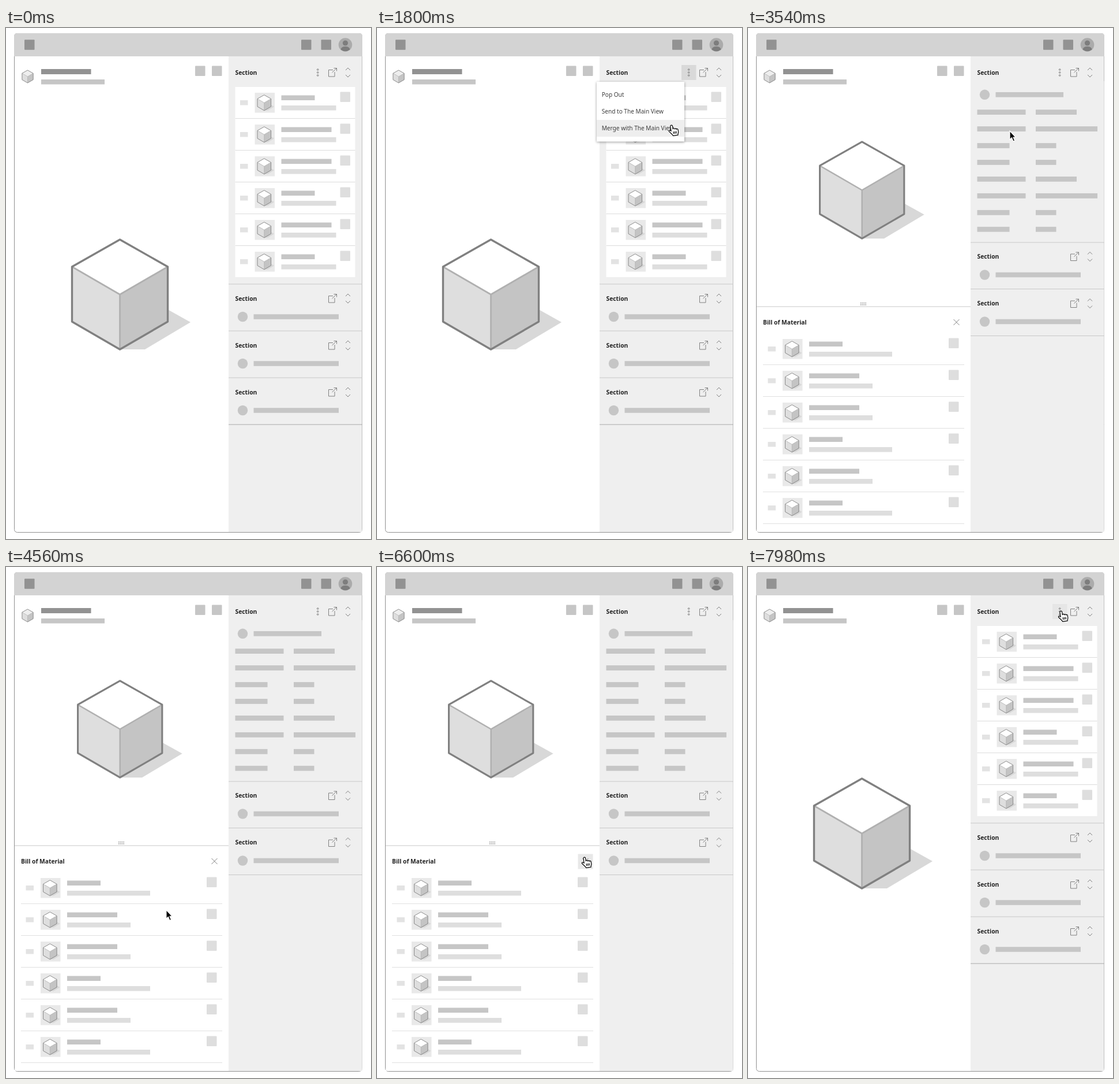
An HTML page for the animation above (8 s loop, 633 by 884 pixels).

```html
<!DOCTYPE html>
<html lang="en">
<head>
<meta charset="utf-8">
<style>
  html, body { margin: 0; width: 100%; height: 100%; overflow: hidden; background: #fff; }
  svg { display: block; }
  text { font: 400 10.1px "Noto Sans", sans-serif; fill: #3c3c3c; }
  .b { font-weight: 600; font-size: 10.3px; fill: #222; }
  .icon { fill: none; stroke: #808080; }
  #menu { filter: drop-shadow(0 1px 2px #0006); }
</style>
</head>
<body>
<svg id="stage" width="633" height="884" viewBox="0 0 633 884"></svg>
<script>
const MID = '#c6c6c6', PALE = '#dedede', DARK = '#929292';
const shortRows = [1, 0, 0, 1, 0, 1];

const rect = (x, y, w, h, fill, more = '') =>
  `<rect x="${x}" y="${y}" width="${w}" height="${h}" fill="${fill}" ${more}/>`;
const circle = (x, y, r, fill) => `<circle cx="${x}" cy="${y}" r="${r}" fill="${fill}"/>`;
const line = (x1, x2, y, color) => `<path d="M${x1} ${y}H${x2}" stroke="${color}"/>`;
const text = (x, y, s, cls = '') => `<text x="${x}" y="${y}" class="${cls}">${s}</text>`;
const square = (x, y, fill, size = 17.5) => rect(x, y, size, size, fill, 'rx="1"');

function cube(x, y, scale, width, top = '#fff', shadow = true) {
  const k = 'vector-effect="non-scaling-stroke" stroke-linejoin="round"';
  return `<g transform="translate(${x} ${y}) scale(${scale})">
    ${shadow ? '<path d="M83 26L122.500 48L43.500 95H0Z" fill="#d8d8d8"/>' : ''}
    <path d="M0-95L83-48L0 0L-83-48Z" fill="${top}"/>
    <path d="M-83-48L0 0V95L-83 47Z" fill="#dedede"/>
    <path d="M83-48L0 0V95L83 47Z" fill="#c4c4c4"/>
    <path d="M-83-48L0 0L83-48M0 0V95" fill="none" stroke="#b0b0b0" stroke-width="${width * .8}" ${k}/>
    <path d="M0-95L83-48V47L0 95L-83 47V-48Z" fill="none" stroke="#808080" stroke-width="${width}" ${k}/>
  </g>`;
}

// One part row; x and y are the corner of its thumbnail
const row = (x, y, isShort, subWidth, squareX) =>
  rect(x - 25.5, y + 13, 13.5, 8.5, '#e3e3e3') +
  rect(x, y, 34.5, 34.5, '#e9e9e9') + cube(x + 16.3, y + 17.3, .142, .9) +
  rect(x + 46, y + 4.5, isShort ? 58 : 87, 8.5, MID) +
  rect(x + 46, y + 22, subWidth, 8.5, PALE) + square(squareX, y - 1.5, PALE);

const header = y => text(397.5, y + 3.7, 'Section', 'b') +
  `<path class="icon" transform="translate(0 ${y})" d="M567-4.500H559.500V7H570V-1
    M565.500 0L573.500-7.500M568.500-7.500H573.500V-2.500M589-4L593-8L597-4M589 4L593 8L597 4"/>`;
const section = (y, last) => header(y) + circle(410.5, y + 31.5, 8.7, MID) +
  rect(429.5, y + 27.2, 147.5, 8.6, MID) + line(386, 618, y + 56, last ? '#a8a8a8' : '#c8c8c8');

const listView = cube(197.5, 461, 1, 3.4) +
  rect(397.5, 102, 208, 329, '#fff') +
  shortRows.map((s, i) => row(431.5, 112 + 55 * i, s, 95, 579.5) +
    (i ? line(397.5, 605.5, 101.5 + 55 * i, '#dcdcdc') : '')).join('') +
  line(386, 618, 443, '#c8c8c8') +
  [468, 549, 630].map((y, i) => section(y, i === 2)).join('');

const details = Array.from({ length: 8 }, (_, i) => {
  const y = 141.2 + 28.95 * i;
  return rect(397.5, y, [84, 84, 56, 56][i % 4], 8.8, MID) +
    rect(499, y, [71, 107, 35.5, 35.5][i % 4], 8.8, MID);
}).join('');

const grip = Array.from({ length: 8 }, (_, i) =>
  rect(195 + i % 4 * 2.8, i < 4 ? 475 : 478, 1.5, 1.5, '#888')).join('');

const splitView = rect(15, 100, 371, 771.5, '#fff') + rect(386, 92, 231.5, 779.5, '#efefef') +
  cube(197.7, 280.5, .881, 3.1) +
  circle(410.5, 115.3, 8.7, MID) + rect(429.5, 111, 117.5, 8.6, MID) + details +
  line(386, 618, 371, '#c8c8c8') + section(395.5) + section(476.5) +
  grip + line(15, 386, 482, '#c8c8c8') +
  text(26, 512.7, 'Bill of Material', 'b') +
  rect(348.5, 496.500, 26, 26, '#e8e8e8', 'id="closeHover"') +
  '<path class="icon" d="M356.500 504L366.500 514M366.500 504L356.500 514"/>' +
  shortRows.map((s, i) => row(60, 538 + 55 * i, s, s ? 144 : 110, 348) +
    line(26, 375, 582.5 + 55 * i, '#e0e0e0')).join('');

const menu = rect(381, 93, 152, 103.5, '#fff') + rect(381, 159, 152, 29, '#eee', 'id="itemHover"') +
  ['Pop Out', 'Send to The Main View', 'Merge with The Main View']
    .map((s, i) => text(389.7, 119.3 + 29 * i, s)).join('');

const $ = id => document.getElementById(id);
$('stage').innerHTML =
  rect(14.5, 9.5, 603, 863, '#fff', 'rx="5" stroke="#909090"') +
  rect(386, 49, 231.5, 823, '#efefef') +
  '<path d="M14 49V14Q14 9 19 9H613Q618 9 618 14V49Z" fill="#d3d3d3"/>' +
  [32, 512, 546.5].map(x => square(x, 20.3, DARK)).join('') +
  circle(588.5, 29, 11.8, '#ababab') + circle(588.5, 26, 4.6, '#7d7d7d') +
  '<path d="M580.500 37.500Q581 32 588.500 32T596.500 37.500Q588.500 43 580.500 37.500Z" fill="#7d7d7d"/>' +
  cube(37.5, 84, .116, .9, '#eee', false) +
  rect(61, 71, 86.5, 9, DARK) + rect(61, 89, 110, 8.5, MID) +
  square(328, 65.5, MID) + square(357, 65.5, MID) +
  `<g>${listView}</g><g id="split">${splitView}</g>` +
  rect(528, 64, 25.5, 26, '#e6e6e6', 'id="dotsHover"') + header(77) +
  [72, 77, 82].map(y => `<circle class="icon" cx="540.7" cy="${y}" r="1.3"/>`).join('') +
  `<g id="menu">${menu}</g>
  <g id="arrow"><path d="M0 0V15L3.400 11.800L6 18L8.700 17L6.100 11H10.300Z" stroke="#fff" stroke-width="1.2"/></g>
  <g id="hand"><path transform="rotate(-8)" fill="#fff" stroke="#000" stroke-width="1.2" stroke-linejoin="round"
    d="M-2.300 1.800C-2.300-.6 1.300-.6 1.300 1.800V7C1.600 5.400 4.600 5.600 4.600 7.600C5 6.200 7.600 6.400 7.600 8.400
    C8.200 7.200 10 7.600 10 9.400V13C10 15 8.600 16 8.600 18.500H0C-.5 16-3.500 13.500-5.600 10.600
    C-6.800 9-4.800 7.400-3.400 8.800L-2.300 10.200ZM1.600 11.500V15.500M4 11.500V15.500M6.400 11.500V15.500"/></g>`;

// Pointer path: time, x, y
const path = [
  [0, 645, 400], [780, 543, 76], [1500, 543, 76], [1800, 511, 168], [2640, 428, 183],
  [3240, 454, 178], [4020, 454, 178], [4860, 150, 763], [5280, 29, 605], [5700, 110, 744],
  [6540, 360, 502], [7140, 360, 502], [7980, 543, 76], [8000, 543, 76]
];

const slope = (i, axis) => path[i] && path[i + 1]
  ? (path[i + 1][axis] - path[i][axis]) / (path[i + 1][0] - path[i][0]) : 0;
function tangent(i, axis) {
  const a = slope(i - 1, axis), b = slope(i, axis);
  return a * b > 0 ? 2 * a * b / (a + b) : 0;
}
// Monotone cubic through the path points
function along(t, axis) {
  let i = 0;
  while (i < path.length - 2 && t >= path[i + 1][0]) i++;
  const span = path[i + 1][0] - path[i][0], u = (t - path[i][0]) / span, v = 1 - u;
  return path[i][axis] * (1 + 2 * u) * v * v + path[i + 1][axis] * u * u * (3 - 2 * u) +
    span * u * v * (tangent(i, axis) * v - tangent(i + 1, axis) * u);
}

const ramp = (t, a, b) => Math.min(1, Math.max(0, (t - a) / (b - a)));
const inside = (x, y, l, t, r, b) => x >= l && x <= r && y >= t && y <= b;
const show = (id, on) => $(id).style.display = on ? '' : 'none';

function draw(t) {
  const x = along(t, 1), y = along(t, 2);
  const split = ramp(t, 3360, 3480) - ramp(t, 6660, 6840);
  const open = ramp(t, 900, 1080) - ramp(t, 3360, 3480);
  const overDots = inside(x, y, 528, 64, 553.5, 90);
  const overClose = split > .5 && inside(x, y, 348, 496, 375, 523);
  const overItem = open > .5 && inside(x, y, 381, 101, 533, 188);
  const hand = overDots || overClose || overItem;

  $('split').style.opacity = split;
  $('menu').style.opacity = open;
  show('dotsHover', overDots || open > 0);
  $('dotsHover').setAttribute('fill', open > 0 ? '#d9d9d9' : '#e6e6e6');
  show('closeHover', overClose);
  show('itemHover', overItem);
  $('itemHover').setAttribute('y', 101 + 29 * Math.min(2, Math.floor((y - 101) / 29)));
  show('hand', hand);
  show('arrow', !hand);
  for (const id of ['hand', 'arrow']) $(id).setAttribute('transform', `translate(${x} ${y})`);
}

const start = performance.now();
function tick() {
  draw((performance.now() - start) % 8000);
  requestAnimationFrame(tick);
}
tick();
</script>
</body>
</html>
```
